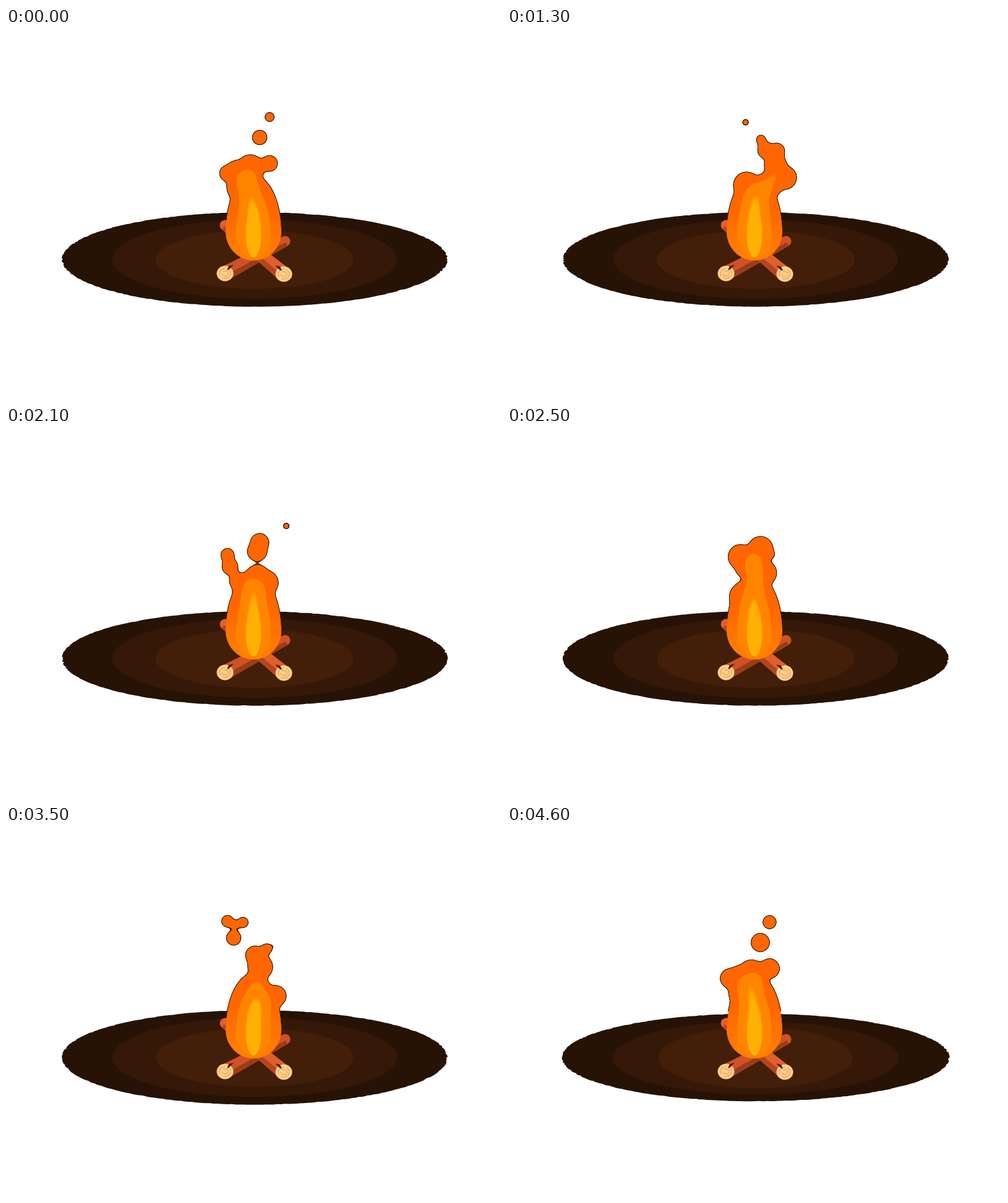
Recreate the animation shown at these times as an HTML page. Size 800x600 px, loop 4700 ms.

```html
<!DOCTYPE html>
<html lang="en">
<head>
<meta charset="utf-8">
<title>Campfire</title>
<style>
  html, body { margin: 0; width: 100%; height: 100%; overflow: hidden; background: #fff; }
  svg { display: block; }
</style>
</head>
<body>
<svg width="800" height="600" viewBox="0 0 800 600">
  <defs id="defs">
    <linearGradient id="body" gradientUnits="userSpaceOnUse" x1="0" y1="290" x2="0" y2="376">
      <stop stop-color="#ff6600"/><stop offset="1" stop-color="#ff8000"/>
    </linearGradient>
    <clipPath id="air"><rect width="800" height="300"/></clipPath>
    <g id="fire">
      <rect x="355" y="238" width="90" height="300" rx="45" ry="95"/>
      <g id="balls"></g>
    </g>
  </defs>
  <g id="ground"></g>
  <g id="logs"></g>
  <g id="flame"></g>
</svg>
<script>
const LOOP = 4700, STEP = 100;
const RISE = 0.115, SHRINK = 0.03, SPREAD = 1 / 1600; // per ms
const $ = id => document.getElementById(id);

// Fire balls [x, y, radius] at the moment each wave peaks
const waves = {
  0: [[358, 235, 13], [395, 227, 22], [426, 219, 13], [380, 258, 23],
      [426, 144, 8], [410, 177, 12]],
  800: [[367, 190, 16], [391, 184, 13], [412, 177, 13], [389, 210, 21],
        [408, 238, 23], [424, 255, 23], [436, 296, 18], [348, 142, 6]],
  1300: [[418, 198, 13], [436, 199, 13], [434, 222, 18], [449, 242, 19],
         [424, 252, 20], [387, 254, 21]],
  2100: [[358, 207, 11], [362, 226, 13], [374, 249, 13], [406, 252, 22],
         [420, 252, 20], [410, 187, 15], [406, 201, 16], [453, 160, 6]],
  2900: [[370, 164, 13], [384, 179, 14], [413, 151, 10], [421, 190, 10],
         [378, 229, 24], [408, 229, 20], [378, 258, 22], [424, 262, 21]],
  3500: [[358, 154, 10], [383, 156, 9], [368, 181, 12], [402, 209, 15],
         [421, 199, 9], [411, 228, 20], [436, 275, 17]],
};

const rand = n => { const v = Math.sin(n * 12.9898) * 43758.5453; return v - Math.floor(v); };

// Balls rise, spread out and shrink as time passes
function fireBalls(t) {
  let out = '';
  for (const [peak, balls] of Object.entries(waves)) {
    const dt = (t - peak + 1.5 * LOOP) % LOOP - LOOP / 2;
    for (const [x0, y0, r0] of balls) {
      const x = 400 + (x0 - 400) * (1 + dt * SPREAD);
      const y = y0 - RISE * dt;
      const r = Math.min(r0 - SHRINK * dt, Math.max(r0, 20));
      if (r > 0 && y < 340) out += `<circle cx="${x}" cy="${y}" r="${r}"/>`;
    }
  }
  return out;
}

// One flame layer: blur the balls together, keep what is denser than the threshold
function layer(name, fill, blur, threshold, gain, clip) {
  $('defs').innerHTML += `
    <filter id="${name}" filterUnits="userSpaceOnUse" x="200" y="0" width="400" height="600"
      color-interpolation-filters="sRGB">
      <feGaussianBlur stdDeviation="${blur}"/>
      <feColorMatrix values="1 0 0 0 0  0 1 0 0 0  0 0 1 0 0  0 0 0 ${gain} ${0.5 - gain * threshold}"/>
    </filter>`;
  $('flame').innerHTML += `<g clip-path="url(#${clip})">
    <use href="#fire" fill="${fill}" filter="url(#${name})"/></g>`;
}

// Clip that rounds off the foot of a layer
function bowl(name, rx, bottom) {
  $('defs').innerHTML += `<clipPath id="${name}"><path d="M200 0H600V330H${400 + rx}
    A${rx} ${bottom - 330} 0 0 1 ${400 - rx} 330H200Z"/></clipPath>`;
  return name;
}

const oval = (x, y, rx, ry, color, more = '') =>
  `<ellipse cx="${x}" cy="${y}" rx="${rx}" ry="${ry}" fill="${color}" ${more}/>`;

function ground(step) {
  const low = step % 10 >= 6 && step % 10 <= 8;
  const rx = low ? 313.5 : 312, ry = low ? 71 : 76.5;
  const points = Array.from({ length: 320 }, (_, i) => {
    const a = i * Math.PI / 160, k = 1 - 0.008 * rand(i + step * 320) ** 3;
    return [402 + rx * k * Math.cos(a), 374.3 + ry * k * Math.sin(a)];
  });
  return `<polygon points="${points.join(' ')}" fill="#261306"/>` +
    oval(402, low ? 375 : 374, low ? 231 : 230, low ? 59 : 64, '#351808') +
    oval(402, 374.5, low ? 157 : 160, low ? 49.5 : 47.5, '#431e08');
}

// Tapered log from its cut end to its round far end, darker along its lower side
function log(x1, y1, x2, y2, light, dark) {
  const a = Math.atan2(y2 - y1, x2 - x1), length = Math.hypot(x2 - x1, y2 - y1);
  const side = Math.sign(x2 - x1);
  const rings = [9, 5].map((r, i) =>
    oval(x1, y1, r, r - 1, 'none', `stroke="#e3aa66" stroke-width="1.5" stroke-dasharray="${18 - 4 * i} 4"`));
  return `<g transform="translate(${x1} ${y1}) rotate(${a * 180 / Math.PI}) scale(1 ${side})">
      <path d="M0-12L${length}-8.5a8.5 8.5 0 0 1 0 17L0 12Z" fill="${light}"/>
      <path d="M0 3L${length} 2L${length} 8.5L0 12Z" fill="${dark}"/>
    </g>` + oval(x1, y1, 13.5, 12.5, '#ffd08a') + rings.join('') +
    `<path d="M${x1 + side * 3} ${y1 - 5}l${side * 3}-7l${side * 8}-2l${-side * 7} 7z" fill="#431a0a"/>`;
}

$('logs').innerHTML =
  log(354, 397, 451, 345, '#cf5227', '#9c3c1a') +
  log(449, 398, 354, 319, '#e0602b', '#b5451f');

layer('edge', '#3a1a08', 4, 0.4, 20, 'air');
layer('rim', 'url(#body)', 4, 0.5, 20, bowl('rimFoot', 45, 376));
layer('core', '#ff8500', 18, 0.827, 50, bowl('coreFoot', 30, 372));
layer('heart', '#ffb005', 18, 0.97, 60, bowl('heartFoot', 13, 371));

const start = performance.now();
let shown = -1;
function frame() {
  const step = Math.floor((performance.now() - start) % LOOP / STEP);
  if (step !== shown) {
    shown = step;
    $('balls').innerHTML = fireBalls(step * STEP);
    $('ground').innerHTML = ground(step);
  }
  requestAnimationFrame(frame);
}
frame();
</script>
</body>
</html>
```
